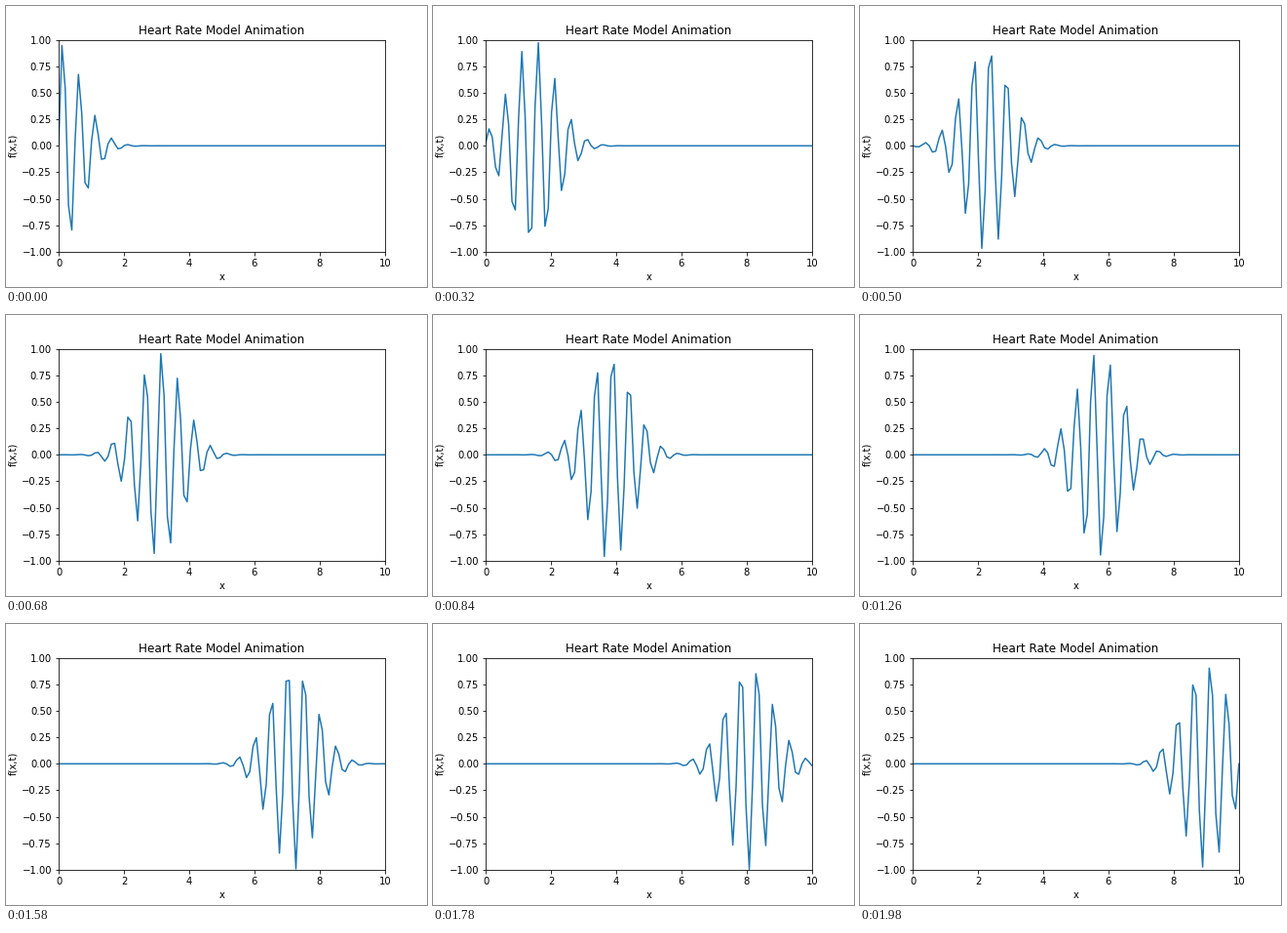
These frames come from a looping animation (432x288 px, 2000 ms). A matplotlib script:

```python
import numpy as np
import matplotlib.pyplot as plt
from matplotlib.animation import FuncAnimation

FRAMES = 100
LOOP_MS = 2000

plt.rcParams["font.family"] = "DejaVu Sans"
plt.rcParams["font.size"] = 10

x = np.linspace(0, 10, 100)
times = np.linspace(0, 3, FRAMES)


def pulse(x, t):
    """Wave packet: the envelope travels three times as fast as the carrier."""
    return np.exp(-(x - 3 * t) ** 2) * np.sin(4 * np.pi * (x - t))


fig, ax = plt.subplots(figsize=(6, 4), dpi=72, facecolor="white")
fig.subplots_adjust(left=0.125, right=0.9, bottom=0.125, top=0.88)
ax.set(xlim=(0, 10), ylim=(-1, 1), xlabel="x", ylabel="f(x,t)",
       title="Heart Rate Model Animation")
ax.set_xticks(np.arange(0, 11, 2))
ax.set_yticks(np.linspace(-1, 1, 9))
line, = ax.plot(x, pulse(x, 0), color="#1f77b4", linewidth=1.5)


def update(i):
    line.set_ydata(pulse(x, times[i]))
    return line,


anim = FuncAnimation(fig, update, frames=FRAMES, interval=LOOP_MS / FRAMES,
                     repeat=True, repeat_delay=0, blit=False)

plt.show()
```
